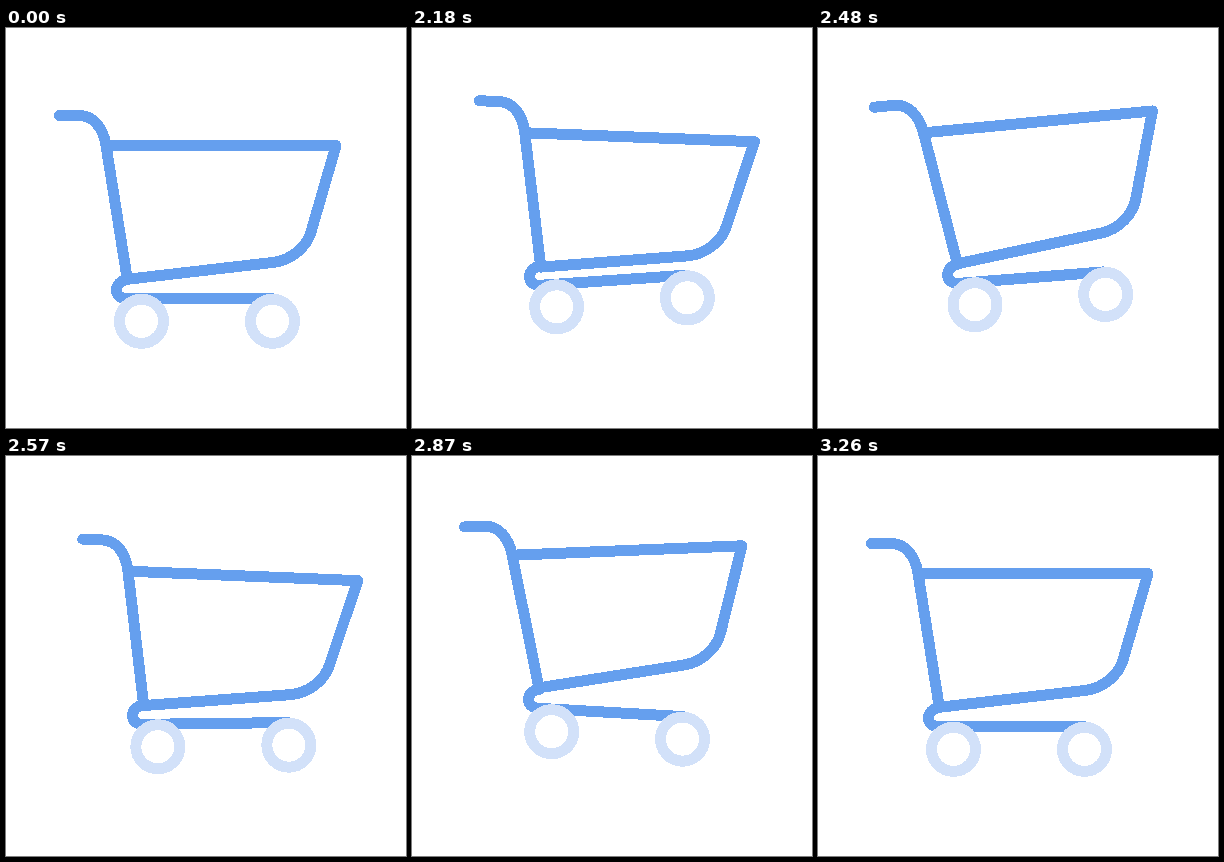
An HTML page for the animation above (3320 ms loop, 400 by 400 pixels).

```html
<!DOCTYPE html>
<html lang="en">
<head>
<meta charset="utf-8">
<title>Shopping cart hop</title>
<style>
  html, body { margin: 0; width: 100%; height: 100%; overflow: hidden; background: #fff; }
  svg { display: block; width: 100%; height: 100%; shape-rendering: crispEdges; }
  path, circle { fill: none; stroke-width: 11; stroke-linecap: round; stroke-linejoin: round; }
  path { stroke: #659fee; }
  circle { stroke: #d2e1f9; }
</style>
</head>
<body>
<svg viewBox="0 0 400 400">
  <g id="cart">
    <path d="M121 251.5C107 254 107 270.7 121 270.7H266"/>
    <path id="basket" d="M53.5 87.5H73C87 87.5 97 99 100 117.5L121.3 251.3L268 234.3C286 232 301 218 305 204L330 117.7H100"/>
    <circle cx="135.5" cy="293.3" r="22"/>
    <circle cx="266.5" cy="293.3" r="22"/>
  </g>
</svg>
<script>
const LOOP = 3320, START = 2030, STEP = 30;
const TAKEOFF = 2090, LANDING = 2585, REST = 3070;
const cart = document.getElementById('cart');
const basket = document.getElementById('basket');

const progress = (t, from, to) => Math.min(1, Math.max(0, (t - from) / (to - from)));
const smooth = u => u * u * (3 - 2 * u);
const hop = (t, from, to) => Math.sin(Math.PI * progress(t, from, to));

// Basket swing: successive turning points as [time, degrees].
const swings = [[1985, 0], [2105, 9.5], [2345, -4.8], [2660, 5], [2780, -6.6], [3150, 0]];

function lean(t) {
  let angle = 0;
  for (let i = 1; i < swings.length; i++) {
    const [from, a] = swings[i - 1], [to, b] = swings[i];
    angle += (b - a) * smooth(progress(t, from, to));
  }
  return angle;
}

function draw(time) {
  const t = time < START ? 0 : START + Math.floor((time - START) / STEP) * STEP;
  const big = hop(t, TAKEOFF, LANDING), small = hop(t, LANDING, REST);
  const x = 31 * smooth(progress(t, TAKEOFF, 2340)) * (1 - progress(t, 2340, 3180)) ** 2;
  const y = -26.8 * big - 18.3 * small;
  const tilt = -7.3 * big + 3.4 * small;
  cart.setAttribute('transform', `translate(${x} ${y}) rotate(${tilt} 135.5 293.3)`);
  basket.setAttribute('transform', `rotate(${lean(t)} 110 262)`);
}

const begin = performance.now();
function tick() {
  draw((performance.now() - begin) % LOOP);
  requestAnimationFrame(tick);
}
tick();
</script>
</body>
</html>
```
